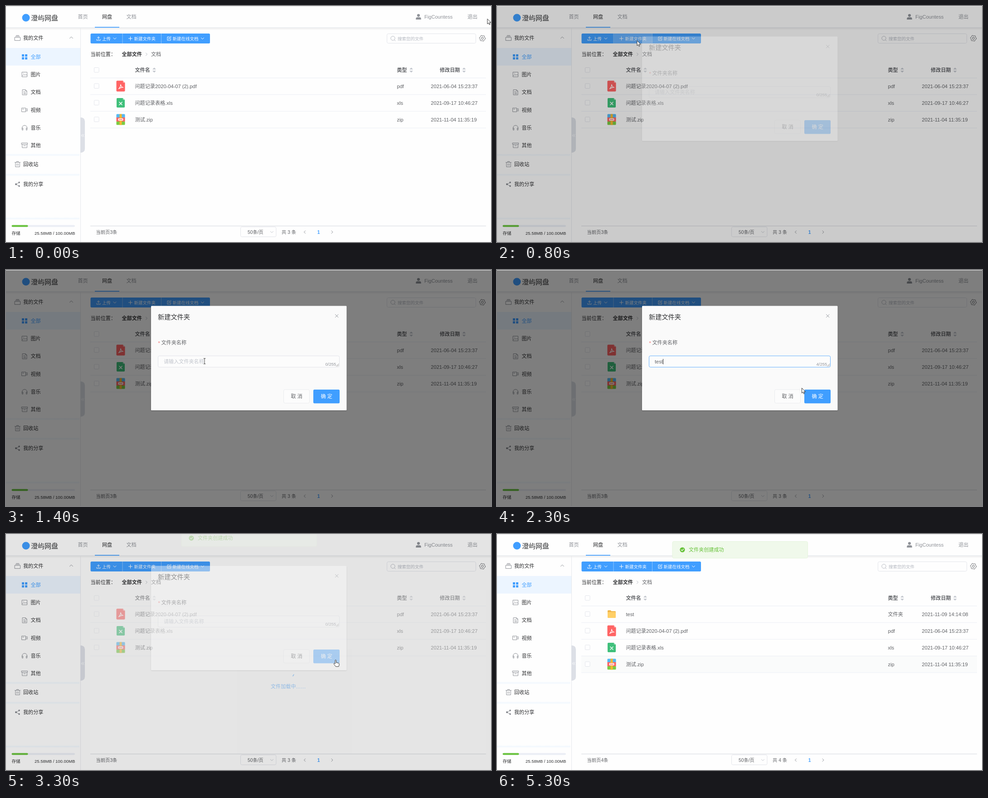
An HTML page for the animation above (5.9 s loop, 1070x523 px).

```html
<!DOCTYPE html>
<html lang="zh-CN">
<head>
<meta charset="utf-8">
<title>网盘</title>
<style>
html, body { margin: 0; width: 100%; height: 100%; overflow: hidden; background: #fefefe; }
svg { display: block; }
text { font-family: "Liberation Sans", "Noto Sans CJK SC", "Noto Sans CJK", sans-serif; white-space: pre; }
</style>
</head>
<body>
<svg id="stage" width="1070" height="523" viewBox="0 0 1070 523"></svg>
<script>
const BLUE = '#409eff', INK = '#303133', TEXT = '#606266', GREY = '#909399',
  EDGE = '#dcdfe6', LINE = '#ebeef5', GREEN = '#67c23a';
const LOOP = 5900, STEP = 100;

// Markup helpers; text is placed by its left edge and vertical centre.
const text = (x, y, size, str, fill = TEXT, attrs = '') =>
  `<text x="${x}" y="${(y + size * 0.37).toFixed(2)}" font-size="${size}" fill="${fill}" ${attrs}>${str}</text>`;
const rect = (x, y, w, h, fill, attrs = '') =>
  `<rect x="${x}" y="${y}" width="${w}" height="${h}" fill="${fill}" stroke-width=".8" ${attrs}/>`;
const line = (d, stroke = GREY, w = 1, fill = 'none') =>
  `<path d="${d}" stroke="${stroke}" stroke-width="${w}" fill="${fill}" stroke-linecap="round" stroke-linejoin="round"/>`;
const fillPath = (d, fill) => `<path d="${d}" fill="${fill}"/>`;
const group = (id, body, attrs = '') => `<g id="${id}" ${attrs}>${body}</g>`;
const bold = 'font-weight="700"';

const chevron = (x, y, dir, color, s = 3) => line({
  down: `M${x - s} ${y - s / 2}l${s} ${s} ${s} ${-s}`,
  up: `M${x - s} ${y + s / 2}l${s} ${-s} ${s} ${s}`,
  right: `M${x - s / 2} ${y - s}l${s} ${s} ${-s} ${s}`,
  left: `M${x + s / 2} ${y - s}l${-s} ${s} ${s} ${s}`
}[dir], color);
const sorter = (x, y) =>
  fillPath(`M${x - 4} ${y - 1.5}h8l-4 -4zM${x - 4} ${y + 1.5}h8l-4 4z`, '#c0c4cc');
const checkbox = y => rect(194.5, y - 5.5, 10.5, 10.5, '#fff', `rx="1.5" stroke="${EDGE}"`);
const rule = y => rect(186, y, 873, 1, LINE);

function header() {
  return rect(0, 48, 1070, 6, 'url(#shade)') + rect(0, 0, 1070, 48, '#fefefe') +
    rect(0, 47.5, 1070, 1, '#e4e7ed') +
    `<circle cx="44" cy="26" r="8.5" fill="${BLUE}"/>` +
    text(55, 26, 15, '澄屿网盘', INK, 'font-weight="500"') +
    text(158.5, 24, 11.1, '首页', GREY) + text(212, 24, 11.1, '网盘', INK) +
    text(265.5, 24, 11.1, '文档', GREY) + rect(196, 46.3, 54, 1.7, BLUE) +
    `<circle cx="910" cy="20.8" r="3.1" fill="${GREY}"/>` +
    fillPath('M904.3 30v-1.8q0-3.2 3.2-3.2h5q3.2 0 3.2 3.2V30z', GREY) +
    text(923, 24, 11.1, 'FigCountess', GREY) + text(1018, 24, 11.1, '退出', GREY);
}

function sidebar() {
  const items = ['全部', '图片', '文档', '视频', '音乐', '其他'];
  const icons = [
    fillPath('M35 107h5v5h-5zM42 107h5v5h-5zM35 113.5h5v5h-5zM42 113.5h5v5h-5z', BLUE),
    line('M35.5 146.5h11v10.5h-11zM36 155l3.5-3.5 2.5 2 2-2 2.5 2.5M38.5 149.3h.5'),
    line('M36.5 185.5h6.5l3 3v8.5h-9.5zM43 185.5v3h3M39 189.5h2M39 192h4.5M39 194.5h4.5'),
    line('M35 226h8.5v8.5H35zM43.5 229l3.5-1.5v5.5l-3.5-1.5M37 228.5h2'),
    line('M35.5 273v-3a5.5 5.5 0 0 1 11 0v3M35.5 270.5h2v4.5h-1.5zM46.5 270.5h-2v4.5h1.5z'),
    line('M34.5 303.5h13v3h-13zM35.7 306.5v7.5h10.6v-7.5M39 309.5h4')
  ];
  let out = rect(164, 49, 1, 474, '#e6e8ec') + rect(0, 93, 164, 39, '#ecf5ff');
  items.forEach((s, i) => {
    out += icons[i] + text(54.5, 112.5 + i * 39.3, 11.1, s, i ? INK : BLUE);
  });
  for (const y of [327, 371, 468]) out += rect(0, y, 162, 6, 'url(#band)');
  return out +
    line('M19.5 69.5h12v7h-12zM21 67.3h9M22.5 65.3h6') +
    text(38, 71, 11.1, '我的文件', INK) + chevron(144, 70, 'up', GREY, 3.5) +
    line('M19.5 346.5h12M23.5 346.5v-2h4v2M20.8 346.5v10h9.4v-10M24 349.5v4M27 349.5v4') +
    text(38, 351, 11.1, '回收站', INK) +
    line('M22 395l7-3.7M22 395l7 4') +
    '<g fill="#7a7d84"><circle cx="22" cy="395" r="1.9"/><circle cx="29" cy="391" r="1.7"/><circle cx="29" cy="399" r="1.7"/></g>' +
    text(38, 394.5, 11.1, '我的分享', INK) +
    rect(12.5, 485.5, 139.5, 4, LINE, 'rx="2"') + rect(12.5, 485.5, 36, 4, GREEN, 'rx="2"') +
    text(12.5, 503, 9.5, '存储', INK) + text(63, 503, 9.5, '25.58MB / 100.00MB', INK) +
    fillPath('M164 247h2q8 1 8 9v60q0 8-8 9h-2z', EDGE) +
    chevron(167.5, 287, 'left', '#fff', 2.5) + chevron(170.7, 287, 'left', '#fff', 2.5);
}

function toolbar() {
  const w = '#fff', gx = 1051, gy = 71.5;
  let gear = 'M';
  for (let i = 0; i < 24; i++) {
    const a = i * Math.PI / 12, r = i % 4 < 2 ? 6.6 : 5.4;
    gear += `${i ? 'L' : ''}${(gx + r * Math.cos(a)).toFixed(1)} ${(gy + r * Math.sin(a)).toFixed(1)}`;
  }
  return rect(186.5, 61, 263.5, 22, BLUE, 'rx="2.5"') +
    rect(257.5, 61, 84.5, 22, '#66b1ff', 'id="hover"') +
    rect(256.5, 61, 1, 22, '#8cc5ff') + rect(342, 61, 1, 22, '#8cc5ff') +
    line('M204 74v-5.5M201.5 70.7l2.5-2.5 2.5 2.5M200 74v2h8v-2', w) +
    text(212, 72, 9.5, '上传', w) + chevron(240, 72, 'down', w) +
    line('M270.5 72h8M274.5 68v8', w) + text(282.5, 72, 9.5, '新建文件夹', w) +
    line('M360 68.5h-4v7.5h7.5v-4M359 73l.3-1.7 4-4 1.3 1.3-4 4z', w) +
    text(367.5, 72, 9.5, '新建在线文档', w) + chevron(433.5, 72, 'down', w) +
    rect(840.5, 61.5, 196, 21, '#fefefe', `rx="3" stroke="${EDGE}"`) +
    '<circle cx="853.5" cy="71.5" r="4.6" fill="none" stroke="#b4b8c0"/>' + line('M857 75l2 2.2', '#b4b8c0') +
    text(864, 72, 9.5, '搜索您的文件', '#b4b8c0') +
    line(gear + 'z', TEXT) + `<circle cx="${gx}" cy="${gy}" r="2.4" fill="none" stroke="${TEXT}"/>` +
    text(186.5, 107, 11.1, '当前位置：', INK) + text(255.5, 107, 11.1, '全部文件', INK, bold) +
    chevron(310, 107, 'right', '#b4b8c0') + text(320, 107, 11.1, '文档');
}

// File icons, drawn around their own centre.
const sheet = c => fillPath('M-9.5-10q0-2 2-2H5l4.5 4.5V10q0 2-2 2h-15q-2 0-2-2z', c) +
  fillPath('M5-12v3q0 1.5 1.5 1.5h3z', 'rgba(255,255,255,.5)');
const icon = {
  pdf: sheet('#ff6464') + line('M-4.5 6q4-3 4.5-9.5q1 6 5.5 6.5q-5-.5-10 3z', '#fff', 1.3),
  xls: `<g transform="scale(.95 .87)">${sheet('#40c07b')}</g>` + line('M-3-1.5l6 6M3-1.5l-6 6', '#fff', 1.5),
  zip: rect(-9.5, -12, 19, 8.5, '#56b9f2', 'rx="1.5"') + rect(-9.5, 4, 19, 8, '#7ccb43', 'rx="1.5"') +
    rect(-9.5, -4.5, 19, 9, '#ff6464') + rect(-2.5, -12, 5, 24, '#f7b731') +
    rect(-5.5, -2.5, 11, 5, '#fff', 'rx="1"') + rect(-4, -0.8, 8, 1.6, '#ff6464'),
  dir: fillPath('M-9-7q0-1.5 1.5-1.5h5l2 2H7.5Q9-6.5 9-5V6H-9z', '#f0b64a') +
    rect(-9, -4.5, 18, 13, '#ffcf66', 'rx="1.3"')
};

function row(i, kind, name, type, date) {
  const y = 177.5 + i * 37;
  return checkbox(y) + `<g transform="translate(253 ${y})">${icon[kind]}</g>` +
    text(284.5, y, 11.1, name) + text(862.5, y, 11.1, type) +
    text(937.3, y, 11.1, date) + rule(y + 18.3);
}

function table() {
  return checkbox(142) + text(284.5, 142, 11.1, '文件名', TEXT, bold) + sorter(327, 142) +
    text(862.5, 142, 11.1, '类型', TEXT, bold) + sorter(894, 142) +
    text(957, 142, 11.1, '修改日期', TEXT, bold) + sorter(1010.5, 142) + rule(159) +
    rect(186, 270.5, 873, 36, '#fafbfb', 'id="rowHover"') +
    group('added', row(0, 'dir', 'test', '文件夹', '2021-11-09 14:14:08')) +
    group('files',
      row(0, 'pdf', '问题记录2020-04-07 (2).pdf', 'pdf', '2021-06-04 15:23:37') +
      row(1, 'xls', '问题记录表格.xls', 'xls', '2021-09-17 10:46:27') +
      row(2, 'zip', '测试.zip', 'zip', '2021-11-04 11:35:19'));
}

function footer() {
  return rect(186, 487, 873, 1, '#d5d8de') + text(198.5, 501, 10.3, '', TEXT, 'id="shown"') +
    rect(517.5, 489.5, 78.5, 22, '#fefefe', `rx="3" stroke="${EDGE}"`) +
    text(533, 501, 10.3, '50条/页') + chevron(586.5, 501, 'down', '#c0c4cc') +
    text(608, 501, 10.3, '', TEXT, 'id="total"') +
    chevron(659, 501, 'left', GREY) + text(686.8, 501, 10.3, '1', BLUE, bold) + chevron(719.5, 501, 'right', GREY);
}

function loading() {
  return rect(186, 125, 873, 362, 'rgba(255,255,255,.9)') +
    `<circle id="spin" cx="622" cy="306" r="14" pathLength="125.66" fill="none" stroke="${BLUE}" stroke-width="1.5" stroke-linecap="round"/>` +
    text(584, 338, 11.1, '文件加载中……', BLUE);
}

function dialog() {
  return rect(320, 79.5, 431.5, 231.5, '#fafafa', 'rx="1.5" style="filter:drop-shadow(0 1px 1px rgba(0,0,0,.25))"') +
    text(335, 104, 14.2, '新建文件夹', INK) + line('M726.5 98.5l6.5 6.5M733 98.5l-6.5 6.5') +
    text(335.5, 162, 11.1, '*', '#f56c6c') + text(342.5, 161, 11.1, '文件夹名称') +
    rect(335.5, 190.3, 400, 25, '#fcfcfc', 'id="field" rx="3"') +
    text(348, 203, 11.1, '请输入文件夹名称', '#c0c4cc', 'id="hint"') +
    text(348, 203, 11.1, '', TEXT, 'id="typed"') + rect(0, 197, 1, 12, INK, 'id="caret"') +
    text(704.5, 208, 9.5, '', GREY, 'id="count"') +
    line('M728.5 213.5l5.5-5.5M731.5 213.5l2.5-2.5', '#777', 0.8) +
    rect(612.5, 265, 57, 30, '#fcfcfc', 'rx="3" stroke="#e6e8eb"') + text(628.5, 280, 11.1, '取 消') +
    rect(678, 265, 58, 30.5, BLUE, 'id="ok" rx="2.5"') + text(694.5, 280, 11.1, '确 定', '#fff', 'font-weight="500"');
}

const toast = () =>
  rect(387, 16.5, 298.5, 37, '#f0f9eb', 'rx="3" stroke="#e1f3d8"') +
  `<circle cx="409" cy="35" r="5.6" fill="${GREEN}"/>` + line('M406.3 35l2 2 3.5-3.8', '#fff', 1.2) +
  text(423, 35, 11.1, '文件夹创建成功', GREEN);

const pointers =
  group('arrow', line('M0 0V10.8L2.5 8.5 4.3 12.5 6 11.7 4.3 7.9H7.8z', '#222', 0.9, '#fff')) +
  group('hand', line('M-2 .5q0-1.5 1.2-1.5T.5 .5V5l5 1q1.500.4 1.500 2v2.500l-1.200 3.300H-.5L-4.500 8.500q-.8-1.400.3-2T-2 7.500z', '#222', 0.9, '#fff')) +
  group('beam', line('M-2 0h4M0 0v12M-2 12h4', '#333', 0.9));

const stage = document.getElementById('stage');
stage.innerHTML = `<defs>
  <linearGradient id="shade" x2="0" y2="1"><stop stop-color="#000" stop-opacity=".07"/><stop offset="1" stop-color="#000" stop-opacity="0"/></linearGradient>
  <linearGradient id="band" x2="0" y2="1"><stop stop-color="#409eff" stop-opacity="0"/><stop offset=".5" stop-color="#409eff" stop-opacity=".07"/><stop offset="1" stop-color="#409eff" stop-opacity="0"/></linearGradient>
</defs>` + rect(0, 0, 1070, 523, '#fefefe') + header() + sidebar() + toolbar() + table() + footer() +
  group('mask', loading()) + rect(0, 0, 1070, 523, '#000', 'id="dim"') +
  group('dialog', dialog()) + group('toast', toast()) +
  rect(0, 0, 1070, 1, '#e2e2e2') + group('cursor', pointers);

const el = {};
stage.querySelectorAll('[id]').forEach(n => { el[n.id] = n; });
const show = (n, on) => n.setAttribute('visibility', on ? 'inherit' : 'hidden');
const set = (n, attrs) => { for (const k in attrs) n.setAttribute(k, attrs[k]); };

// Linear track over rows of [time, ...values].
function track(rows, t) {
  const i = rows.findIndex(r => r[0] > t);
  if (i < 0) return rows[rows.length - 1].slice(1);
  if (i === 0) return rows[0].slice(1);
  const a = rows[i - 1], b = rows[i], k = (t - a[0]) / (b[0] - a[0]);
  return a.slice(1).map((v, j) => v + (b[j + 1] - v) * k);
}

const PATH = [[0, 1062, 29], [100, 1040, 20], [200, 790, 36], [300, 470, 66], [400, 325, 80],
  [500, 309, 77], [800, 309, 77], [900, 316, 83], [1000, 345, 110], [1200, 405, 165], [1400, 438, 196],
  [1900, 438, 196], [2000, 450, 205], [2300, 672.5, 262], [2400, 712, 275], [2500, 728, 280],
  [5000, 728, 280], [5100, 735, 306], [5200, 750, 348]];
const DIALOG = [[700, 0], [800, 0.28], [900, 0.82], [1000, 1], [3200, 1], [3300, 0.46], [3400, 0.1], [3500, 0]];
const DIM = [[700, 0], [800, 0.2], [900, 0.47], [1000, 0.5], [3200, 0.5], [3300, 0.1], [3400, 0]];
const TOAST = [[3200, 0], [3300, 0.3], [3400, 0.81], [3500, 0.97], [3600, 1]];
const MASK = [[3200, 0], [3300, 0.5], [3400, 0.9], [3500, 1], [4200, 1], [4300, 0.6], [4400, 0.15], [4500, 0]];
const LETTERS = [1700, 1800, 1900, 2000];
const CARETS = [348, 351, 357.2, 362.8, 366];
const within = (t, a, b) => t >= a && t < b;
const smooth = u => u * u * (3 - 2 * u);

function spin(t) {
  const e = Math.max(0, 100 + (t - 3300) * 1.125), p = e % 1500 / 750;
  const k = smooth(p % 1), grow = p < 1;
  set(el.spin, {
    'stroke-dasharray': `${grow ? 1 + 89 * k : 90} 150`,
    'stroke-dashoffset': grow ? -40 * k : -40 - 80 * k,
    transform: `rotate(${e * 0.18} 622 306)`
  });
}

function draw(t) {
  const [open] = track(DIALOG, t), [drop] = track(TOAST, t), [x, y] = track(PATH, t);
  set(el.dialog, { opacity: open, transform: `translate(0 ${(open - 1) * 16.6})` });
  set(el.toast, { opacity: drop, transform: `translate(0 ${(drop - 1) * 37})` });
  set(el.dim, { opacity: track(DIM, t)[0] });
  set(el.mask, { opacity: track(MASK, t)[0] });
  spin(t);

  const loaded = t >= 4300, n = loaded ? 4 : 3;
  show(el.added, loaded);
  show(el.rowHover, loaded);
  set(el.files, { transform: `translate(0 ${loaded ? 37 : 0})` });
  el.shown.textContent = `当前页${n}条`;
  el.total.textContent = `共 ${n} 条`;

  const len = t < 3300 ? LETTERS.filter(k => k <= t).length : 0;
  const focus = within(t, 1500, 2700);
  el.typed.textContent = 'test'.slice(0, len);
  el.count.textContent = `${len}/255`;
  show(el.hint, !len);
  show(el.caret, focus);
  set(el.caret, { x: CARETS[len] });
  set(el.field, { stroke: focus ? BLUE : EDGE });
  set(el.ok, { fill: within(t, 2500, 3500) ? '#66b1ff' : BLUE });
  show(el.hover, within(t, 400, 1400));

  const hand = within(t, 400, 800) || within(t, 2500, 3500), beam = within(t, 1400, 2100);
  set(el.cursor, { transform: `translate(${x} ${y})` });
  show(el.cursor, t < 5300);
  show(el.hand, hand);
  show(el.beam, beam);
  show(el.arrow, !hand && !beam);
}

const start = performance.now();
function tick() {
  const t = (performance.now() - start) % LOOP;
  draw(Math.floor(t / STEP) * STEP);
  requestAnimationFrame(tick);
}
tick();
</script>
</body>
</html>
```
